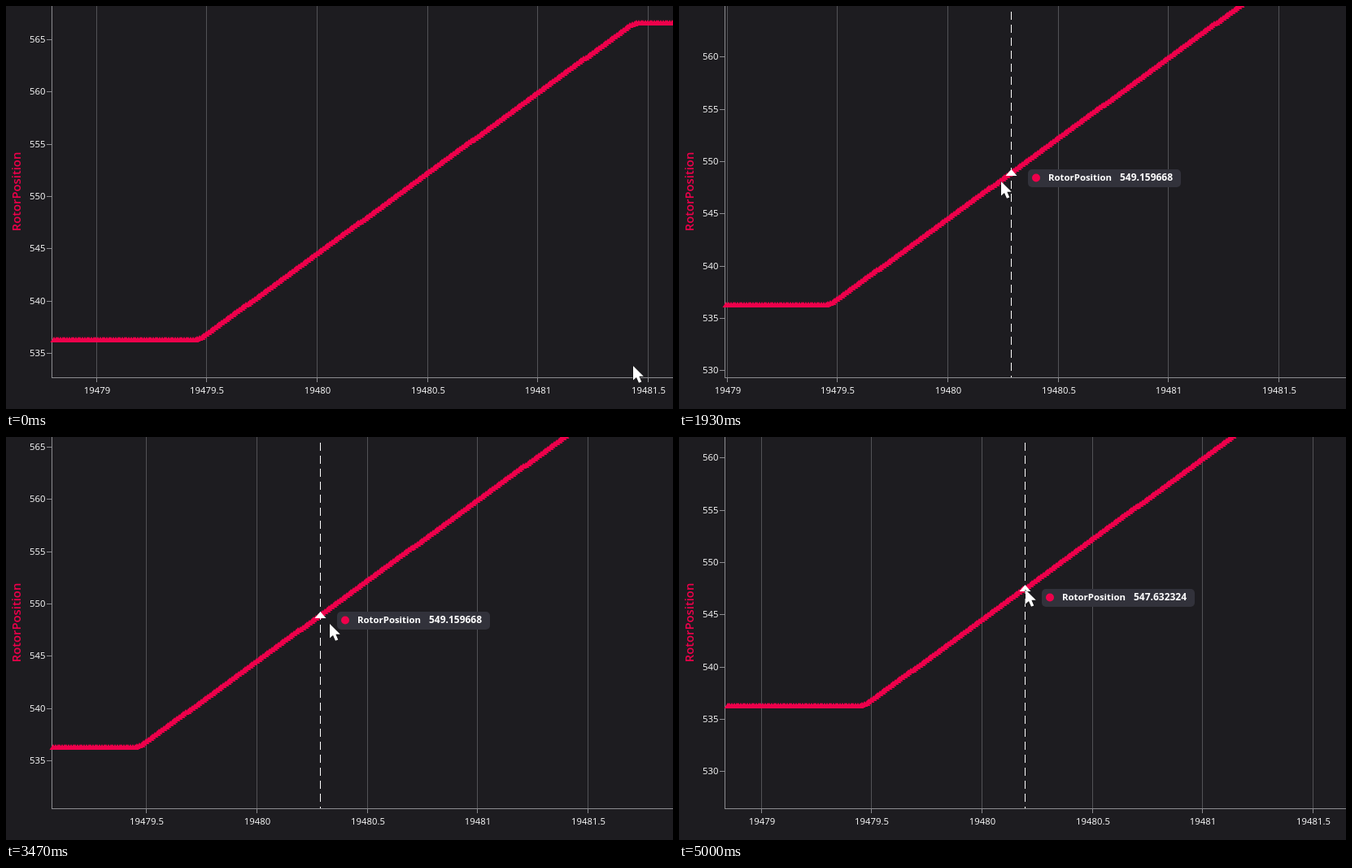
Write an HTML page with a canvas that moves like this. It is 820 by 496 pixels and loops after 5940 ms.

```html
<!DOCTYPE html>
<html lang="en">
<head>
<meta charset="utf-8">
<title>Rotor position</title>
<style>
  html, body { margin: 0; width: 100%; height: 100%; overflow: hidden; background: #1d1c20; }
  canvas { display: block; }
</style>
</head>
<body>
<canvas id="chart" width="820" height="496"></canvas>
<script>
const c = document.getElementById('chart').getContext('2d');
const RED = '#ee004b', WHITE = '#fff', GREY = '#8c8c90';
const FACE = '"Open Sans", "Noto Sans", sans-serif';
const LOOP = 5940, LAST = 75, ARRIVE = 9, REST = 13, GRAB = 15, DROP = 71;
const LEFT = 57, BOTTOM = 457, STEP_X = 135.7, STEP_Y = 64.33;
const SAMPLE = 2.714, HELD = 78;

// Turning points of the drag: step, x, y
const drag = [
  [13, 463, 244], [14, 459, 244], [15, 460, 244], [18, 535, 262], [21, 574, 217],
  [25, 505, 185], [29, 395, 215], [35, 513, 347], [39, 555, 258], [44, 504, 134],
  [48, 385, 175], [53, 410, 240], [58, 524, 277], [64, 530, 200], [71, 450, 164],
  [74, 425, 187]
];

const clamp = (v, lo, hi) => Math.min(Math.max(v, lo), hi);

function slope(i, axis) {
  const a = drag[Math.max(i - 1, 0)], b = drag[Math.min(i + 1, drag.length - 1)];
  return (b[axis] - a[axis]) / (b[0] - a[0]);
}

function spline(k, axis) {
  let i = 0;
  while (i < drag.length - 2 && drag[i + 1][0] <= k) i++;
  const a = drag[i], b = drag[i + 1], h = b[0] - a[0], u = Math.min((k - a[0]) / h, 1);
  return a[axis] * (1 + 2 * u) * (1 - u) ** 2 + b[axis] * u * u * (3 - 2 * u) +
    h * u * (1 - u) * (slope(i, axis) * (1 - u) - slope(i + 1, axis) * u);
}

function pointer(k) {
  if (k >= REST) return { x: Math.round(spline(k, 1)), y: Math.round(spline(k, 2)) };
  const u = Math.min(k / ARRIVE, 1), s = u * u * (3 - 2 * u);
  return { x: Math.round(770 - 307 * s), y: Math.round(442 - 198 * s) };
}

// Curve height relative to the 550 line, d pixels right of 19480
const ramp = d => clamp(70.6 - 0.7297 * d, -213.2, 177);
const curve = d => (ramp(d - 4) + ramp(d + 4)) / 2;

function rect(x, y, w, h, color) {
  c.fillStyle = color;
  c.fillRect(x, y, w, h);
}

function text(str, x, y, font, color = WHITE, align = 'left') {
  c.font = font + ' ' + FACE;
  c.fillStyle = color;
  c.textAlign = align;
  c.fillText(str, x, y);
}

function triangle(x, y, half, top, base) {
  c.moveTo(x, y - top);
  c.lineTo(x + half, y + base);
  c.lineTo(x - half, y + base);
  c.closePath();
}

function axes(ox, oy) {
  const small = '400 11.3px';
  for (let i = -6; i <= 6; i++) {
    const x = Math.floor(ox + i * STEP_X);
    if (x < LEFT || x > 819) continue;
    rect(x, 0, 1, BOTTOM, '#525256');
    rect(x, BOTTOM, 1, 6, GREY);
    text(String(19480 + i / 2), x + 1, 477, small, WHITE, 'center');
  }
  for (let i = -8; i <= 8; i++) {
    const y = Math.round(oy - i * STEP_Y);
    if (y < 0 || y > BOTTOM) continue;
    rect(50, y, 6, 1, GREY);
    text(String(550 + i * 5), 48.5, y + 4, small, WHITE, 'right');
  }
  rect(56, 0, 1, BOTTOM + 1, GREY);
  rect(56, BOTTOM, 764, 1, GREY);
  c.save();
  c.translate(17.5, 228.5);
  c.rotate(-Math.PI / 2);
  text('RotorPosition', 0, 0, '600 14.8px', RED, 'center');
  c.restore();
}

// A row of overlapping triangle markers
function series(ox, oy) {
  c.beginPath();
  for (let i = Math.ceil((LEFT - ox - HELD) / SAMPLE); ; i++) {
    const d = HELD + i * SAMPLE;
    const x = Math.round(ox + d), y = Math.round(oy + curve(d));
    if (x > 826) break;
    if (y > -8 && y <= BOTTOM + 1) triangle(x, y, 4.5, 4, 3);
  }
  c.fillStyle = RED;
  c.fill();
}

function hover(p, ox, oy) {
  const x = p.x + 0.5, d = x - ox, y = p.y + 11;
  c.strokeStyle = WHITE;
  c.lineWidth = 1;
  c.setLineDash([10, 6]);
  c.beginPath();
  c.moveTo(x, 7);
  c.lineTo(x, BOTTOM);
  c.stroke();
  c.setLineDash([]);

  c.beginPath();
  triangle(x, Math.round(oy + curve(d)), 7, 4, 4);
  c.fillStyle = WHITE;
  c.fill();

  const n = clamp(Math.round((d - HELD) / 2.6), -84, 114);
  const value = (549.159668 + Math.round(n * 156.4) / 1024).toFixed(6);
  const left = p.x + 209 > 812 ? p.x - 209 : p.x + 21;
  c.beginPath();
  c.roundRect(left, y - 11, 188, 22, 5);
  c.fillStyle = '#32323b';
  c.fill();
  c.beginPath();
  c.arc(left + 10, y - 0.5, 5, 0, 7);
  c.fillStyle = RED;
  c.fill();
  text('RotorPosition', left + 25, y + 3, '700 11.4px');
  text(value, left + 113, y + 3, '700 12px');
}

const arrow = new Path2D('M0 0V17.5L4 14L7 20.8L10.3 19.4L7.4 12.8H12.8Z');
function drawPointer(p) {
  c.save();
  c.translate(p.x + 1, p.y + 1);
  c.lineWidth = 1;
  c.strokeStyle = '#111';
  c.fillStyle = WHITE;
  c.stroke(arrow);
  c.fill(arrow);
  c.restore();
}

function draw(k) {
  const from = pointer(GRAB), pan = pointer(clamp(k - 1, GRAB, DROP));
  const ox = 382.5 + pan.x - from.x, oy = 234 + pan.y - from.y;
  rect(0, 0, 820, 496, '#1d1c20');
  axes(ox, oy);
  series(ox, oy);
  // The chart trails the pointer by one step
  if (k > 1) hover(pointer(k - 1), ox, oy);
  drawPointer(pointer(k));
}

let shown = -1;
const start = performance.now();
function tick() {
  // 15 steps a second, snapped to hundredths
  const t = Math.floor((performance.now() - start) % LOOP / 10) * 10;
  const k = Math.min(LAST, Math.floor((t + 5) * 0.015));
  if (k !== shown) draw(shown = k);
  requestAnimationFrame(tick);
}
tick();
</script>
</body>
</html>
```
